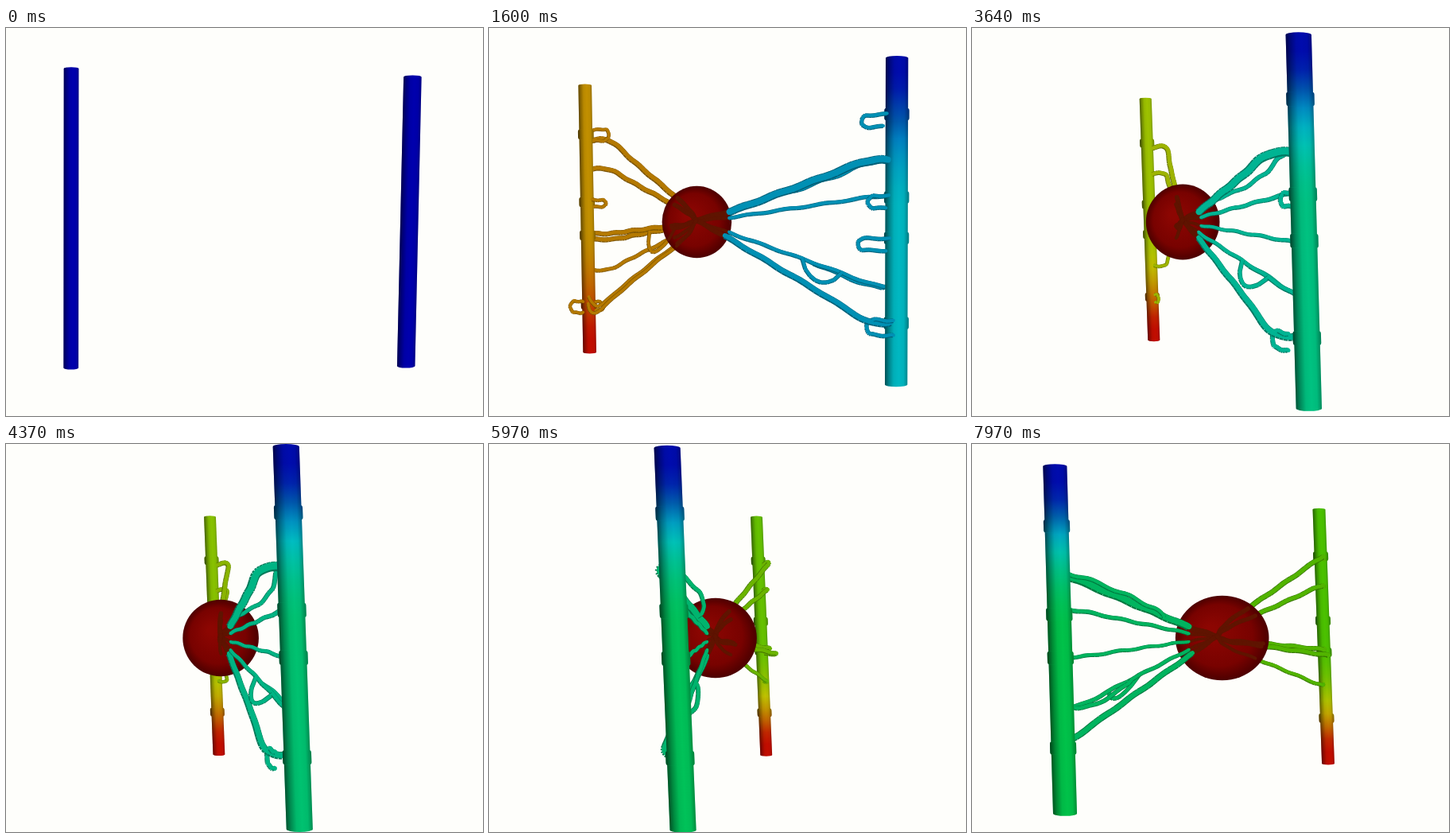
Animation of 600x488 px, one loop 8 s. Source, as an HTML page with a canvas:

```html
<!DOCTYPE html>
<html lang="en">
<head>
<meta charset="utf-8">
<title>Vessel growth</title>
<style>
html, body { margin: 0; width: 100%; height: 100%; overflow: hidden; background: #fefefb; }
canvas { display: block; }
</style>
</head>
<body>
<canvas id="stage" width="600" height="488"></canvas>
<script>
const ctx = document.getElementById('stage').getContext('2d');
const LOOP = 8000, START = 30, GROWTH = 800, DECAY = 500;
const CAMERA = 880, HALF = 187;
const HUB = [-32, -2, 25];

const clamp = v => Math.min(1, Math.max(0, v));
const mix = (a, b, f) => a + (b - a) * f;
const easeOut = f => 1 - (1 - clamp(f)) ** 2;
const fade = (from, to, t, tau) => mix(to, from, Math.exp(-t / tau));

// Points are [across, down, near], with the turning axis at the origin.
const parents = {
  artery: { side: -1, p: -215.5, y: -3, lean: -3, radius: 9.2 },
  vein: { side: 1, p: 210.5, y: 1, lean: -4, radius: 12.7 }
};
const axisAt = (parent, y) =>
  [parent.p + parent.lean * y / (2 * HALF), y, -15 * y / (2 * HALF)];

function scene(t) {
  const u = t / LOOP;
  return {
    angle: (-3.8 + 144 * u + 2.6 * Math.sin(Math.PI * u) ** 6) * Math.PI / 180,
    hues: { artery: fade(10, 108, t, 3700), vein: fade(218, 138, t, 2800) },
    center: [-31 - 10 * u ** 6, 0, HUB[2]],
    rx: 42 + 20 * u ** 1.7,
    ry: 42 + 14 * u
  };
}

// Catmull-Rom curve through a few points.
function curve(points, steps = 9) {
  const at = i => points[Math.min(points.length - 1, Math.max(0, i))];
  const out = [];
  for (let i = 0; i < points.length - 1; i++) {
    for (let k = 0; k < steps; k++) {
      const f = k / steps;
      out.push([0, 1, 2].map(axis => {
        const [a, b, c, d] = [-1, 0, 1, 2].map(o => at(i + o)[axis]);
        return b + f * ((c - a) / 2 + f * (a - 2.5 * b + 2 * c - d / 2 + f * (1.5 * (b - c) + (d - a) / 2)));
      }));
    }
  }
  return [...out, at(points.length)];
}

const vessels = [];
function addVessel(parent, width, path, { birth, death = Infinity } = {}) {
  const n = vessels.length;
  const wavy = path.map(([p, y, q], i) => [p, y + 0.7 * Math.sin(i * 0.9 + n), q]);
  vessels.push({ parent, width, path: wavy, birth: birth ?? 100 + 70 * (n % 5), death });
  return wavy;
}

// Leaves the parent level, bends, then runs straight to the hub.
function feeder(name, height, width, bend, { dip = 0, ...life } = {}) {
  const parent = parents[name];
  const elbow = [parent.p - parent.side * 26, height + dip, bend];
  const entry = [parent.side * 30 - 18, height * 0.18, 23];
  const between = f => elbow.map((v, axis) => mix(v, entry[axis], f));
  const path = curve([[parent.p, height, 0], elbow, between(0.33), between(0.67), entry, HUB]);
  return addVessel(parent, width, path, life);
}

// Follows a stretch of another vessel at a distance.
function bypass(name, base, from, to, drop, shift, death) {
  const piece = base.slice(Math.round(from * base.length), Math.round(to * base.length));
  const path = piece.map(([p, y, q], i) => {
    const swell = Math.sin(Math.PI * i / (piece.length - 1)) ** 0.6;
    return [p, y + drop * swell, q + shift * swell];
  });
  addVessel(parents[name], 5, path, { birth: 500, death });
}

// Short loop out of the parent and back.
function hoop(name, height, reach, rise, depth, death) {
  const parent = parents[name];
  const near = parent.p - parent.side * reach, tip = near - parent.side * Math.sign(reach) * 6;
  const path = curve([
    [parent.p, height, depth], [near, height, depth], [tip, height + rise / 2, depth],
    [near, height + rise, depth], [parent.p, height + rise, depth]
  ]);
  addVessel(parent, 5, path, { birth: 300, death });
}

const thick = feeder('vein', -68, 9.5, 25);
feeder('vein', -29, 5, 0);
feeder('vein', 20, 4.5, -2, { birth: 1700 });
const forked = feeder('vein', 72, 5, -2);
feeder('vein', 112, 7.5, 20);
bypass('vein', thick, 0.1, 0.65, 0, -24);
bypass('vein', forked, 0.33, 0.5, 17, 13);
bypass('vein', forked, 0.12, 0.45, 4, -8);
hoop('vein', -121, 32, 13, 8, 1700);
hoop('vein', -29, 25, 13, 8, 3900);
hoop('vein', 19, 36, 13, 8, 1700);
hoop('vein', 110, 24, 16, 18, 5000);

feeder('artery', -113, 7.5, -16);
feeder('artery', -73, 7, -14);
feeder('artery', 16, 7, -18);
const middle = feeder('artery', 24, 7, -28);
feeder('artery', 66, 5.5, -14);
feeder('artery', 110, 5, 20, { dip: 13, death: 3000 });
feeder('artery', 100, 5, 12, { dip: 14, death: 3000 });
bypass('artery', middle, 0.5, 0.72, 28, 18, 3000);
hoop('artery', -128, 24, 15, -8, 2000);
hoop('artery', -30, 25, 9, 0, 3000);
hoop('artery', 110, -16, 15, 10, 3000);
hoop('artery', 111, 18, 11, -5, 3900);

function projector(angle) {
  const cos = Math.cos(angle), sin = Math.sin(angle);
  return ([p, y, q]) => {
    const near = p * sin + q * cos;
    const scale = 1 / (1 - near / CAMERA);
    return { x: 300.5 + (p * cos - q * sin) * scale, y: 244 + y * scale, near, scale };
  };
}

const tint = (hue, shade = 1) => `hsl(${hue} 100% ${(hue > 205 ? 34 : 38) * shade}%)`;

function drawParent(name, hue, t, project) {
  const parent = parents[name];
  const [top, mid, end] = [-HALF, 0, HALF].map(y => project(axisAt(parent, parent.y + y)));
  const length = end.y - top.y;
  const widen = name === 'vein' ? mix(0.9, 1, clamp(t / 1200)) : 1;
  const r = parent.radius * widen * mid.scale, rim = r * 0.2, wide = r + 1.5;

  // The vein is coldest at its top, the artery hottest at its bottom.
  const along = ctx.createLinearGradient(0, 0, 0, length);
  for (let s = 0; s <= 1; s += 0.05) {
    const fromOpenEnd = name === 'vein' ? s : 1 - s;
    const h = mix(name === 'vein' ? 236 : 4, hue, easeOut((fromOpenEnd - 0.08) / 0.4));
    along.addColorStop(s, t < START ? tint(240) : tint(h));
  }
  const across = ctx.createLinearGradient(-wide, 0, wide, 0);
  [0.65, 0.3, 0.05, 0, 0.04, 0.35].forEach((a, i) => across.addColorStop(i / 5, `rgba(0,0,0,${a})`));

  ctx.save();
  ctx.transform(1, 0, (end.x - top.x) / length, 1, top.x, top.y);
  const fill = shape => [along, across].forEach(paint => {
    ctx.fillStyle = paint;
    ctx.fill(shape);
  });
  const body = new Path2D();
  body.ellipse(0, rim, r, rim, 0, Math.PI, 0);
  body.ellipse(0, length - rim, r, rim, 0, 0, Math.PI);
  fill(body);
  if (t > 200) for (const y of [-120, -26, 20, 116]) {
    const collar = new Path2D(), h = 7 * mid.scale;
    collar.roundRect(-wide, (y - parent.y + HALF) * mid.scale - h, 2 * wide, 2 * h, 3);
    fill(collar);
  }
  ctx.restore();
}

function drawTumor({ x, y, scale }, rx, ry) {
  ctx.save();
  ctx.translate(x, y);
  ctx.scale(rx * scale, ry * scale);
  const shade = ctx.createRadialGradient(-0.25, -0.2, 0.1, 0, 0, 1);
  shade.addColorStop(0, '#8c0602');
  shade.addColorStop(0.7, '#780200');
  shade.addColorStop(1, '#4c0000');
  ctx.fillStyle = shade;
  ctx.beginPath();
  ctx.arc(0, 0, 1, 0, 7);
  ctx.fill();
  ctx.restore();
}

function line(a, b, color, width, shift, cap) {
  ctx.strokeStyle = color;
  ctx.lineWidth = width;
  ctx.lineCap = cap;
  ctx.beginPath();
  ctx.moveTo(a.x + shift, a.y - shift);
  ctx.lineTo(b.x + shift, b.y - shift);
  ctx.stroke();
}

function drawSegment(a, b, width, hue, inside) {
  const w = width * a.scale;
  if (inside) return line(a, b, '#5f1400', w * 0.8, 0, 'round');
  line(a, b, tint(hue, 0.62), w, 0, 'butt');
  line(a, b, tint(hue, 0.93), w * 0.74, w * 0.06, 'round');
}

function draw(t) {
  const { angle, hues, center, rx, ry } = scene(t);
  const project = projector(angle);
  const items = Object.keys(parents).map(name => ({
    near: project(axisAt(parents[name], 0)).near,
    paint: () => drawParent(name, hues[name], t, project)
  }));

  if (t >= START) {
    const tumor = project(center);
    items.push({ near: tumor.near, paint: () => drawTumor(tumor, rx, ry) });

    for (const { parent, width, path, birth, death } of vessels) {
      const shown = Math.min(clamp((t - birth) / GROWTH), 1 - clamp((t - death) / DECAY));
      const hue = parent === parents.vein ? hues.vein + 9 : hues.artery - 4;
      for (let i = 1; i <= shown * (path.length - 1); i++) {
        const [p, y, q] = path[i];
        const [axisP, , axisQ] = axisAt(parent, y);
        if (Math.hypot(p - axisP, q - axisQ) < parent.radius) continue;
        const a = project(path[i - 1]), b = project(path[i]);
        const inside = Math.hypot((p - center[0]) / rx, y / ry, (q - center[2]) / rx) < 0.92;
        items.push({
          near: inside ? tumor.near + 0.01 : (a.near + b.near) / 2,
          paint: () => drawSegment(a, b, width, hue, inside)
        });
      }
    }
  }

  ctx.fillStyle = '#fefefb';
  ctx.fillRect(0, 0, 600, 488);
  items.sort((a, b) => a.near - b.near).forEach(item => item.paint());
}

const began = performance.now();
function tick() {
  draw((performance.now() - began) % LOOP);
  requestAnimationFrame(tick);
}
tick();
</script>
</body>
</html>
```
